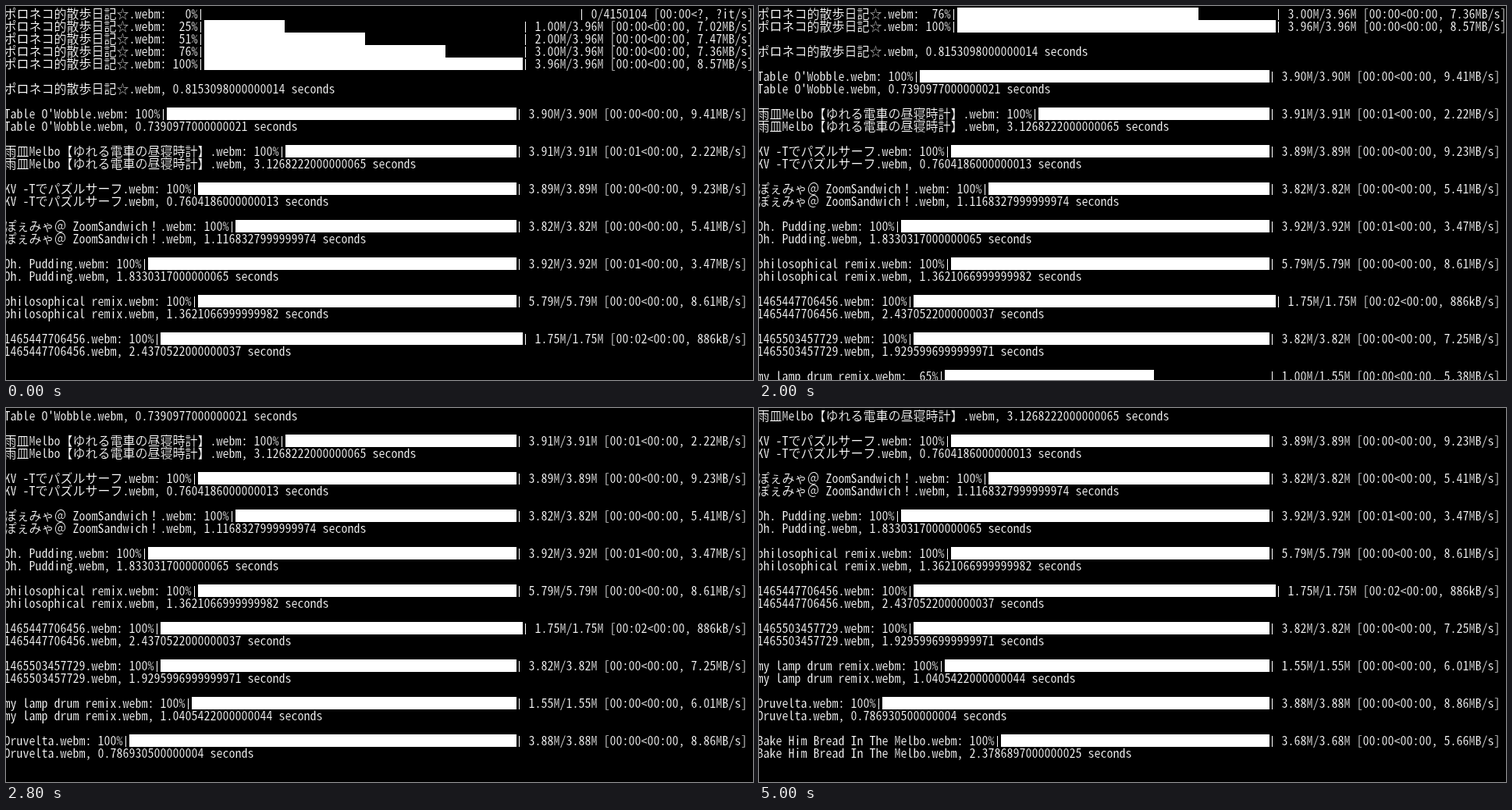
Recreate the animation shown at these times as an HTML page with a canvas. Size 957 by 479 pixels, loop 5.3 s.

```html
<!DOCTYPE html>
<html lang="ja">
<head>
<meta charset="utf-8">
<title>Download log</title>
<style>
  html, body { margin: 0; width: 100%; height: 100%; overflow: hidden; background: #000; }
  canvas { display: block; }
</style>
</head>
<body>
<canvas id="stage" width="957" height="479"></canvas>
<script>
const ctx = document.getElementById('stage').getContext('2d');
const LOOP = 5300, MB = 1048576;
const CELL = 8, ROW = 16, LEFT = -2, TOP = 2, ROWS = 30, COLS = 119;

const file = (name, bytes, rate, elapsed, seconds) =>
  ({ name: name + '.webm', bytes, rate, elapsed, seconds });

const first = file('ポロネコ的散歩日記☆', 4150104, '8.57MB/s', '00:00', '0.8153098000000014');
const finished = [
  file("Table O'Wobble", 4089446, '9.41MB/s', '00:00', '0.7390977000000021'),
  file('雨皿Melbo【ゆれる電車の昼寝時計】', 4099932, '2.22MB/s', '00:01', '3.1268222000000065'),
  file('KV -Tでパズルサーフ', 4078960, '9.23MB/s', '00:00', '0.7604186000000013'),
  file('ぽぇみゃ＠ ZoomSandwich！', 4005560, '5.41MB/s', '00:00', '1.1168327999999974'),
  file('Oh. Pudding', 4110418, '3.47MB/s', '00:01', '1.8330317000000065'),
  file('philosophical remix', 6071255, '8.61MB/s', '00:00', '1.3621066999999982'),
  file('1465447706456', 1835008, '886kB/s', '00:02', '2.4370522000000037')
];

// steps: [time, megabytes loaded, rate]
const jobs = [
  { file: file('1465503457729', 4005560, '7.25MB/s', '00:00', '1.9295996999999971'),
    steps: [[700, 0], [900, 1, '5.42MB/s'], [1000, 2, '6.00MB/s']], done: 1200 },
  { file: file('my lamp drum remix', 1625293, '6.01MB/s', '00:00', '1.0405422000000044'),
    steps: [[1900, 0], [2000, 1, '5.38MB/s']], done: 2100 },
  { file: file('Oruvelta', 4068475, '8.86MB/s', '00:00', '0.786930500000004'),
    steps: [[2400, 0], [2600, 1, '6.92MB/s'], [2700, 2, '7.64MB/s']], done: 2800 },
  { file: file('Bake Him Bread In The Melbo', 3860608, '5.66MB/s', '00:00', '2.3786897000000025'),
    steps: [[4400, 0], [4700, 1, '4.31MB/s'], [4800, 2, '4.87MB/s']], done: 5000 }
];

const isWide = ch => ch >= '\u2600';
const cellsOf = text => [...text].reduce((n, ch) => n + (isWide(ch) ? 2 : 1), 0);
const size = bytes => (bytes / MB).toFixed(2) + 'M';

function progress(f, bytes = f.bytes, rate = f.rate) {
  const part = bytes / f.bytes;
  const head = `${f.name}: ${String(Math.round(part * 100)).padStart(3)}%|`;
  const tail = bytes
    ? `| ${size(bytes)}/${size(f.bytes)} [${f.elapsed}<00:00, ${rate}]`
    : `| 0/${f.bytes} [00:00<?, ?it/s]`;
  // the star counts as one column but fills two
  const cols = COLS + (f.name.includes('☆') ? 1 : 0);
  return { head, tail, part, start: cellsOf(head), end: cols - tail.length };
}

const summary = f => ({ head: `${f.name}, ${f.seconds} seconds` });
const block = f => [progress(f), summary(f), null];

const history = [
  progress(first, 0),
  progress(first, MB, '7.02MB/s'),
  progress(first, 2 * MB, '7.47MB/s'),
  progress(first, 3 * MB, '7.36MB/s'),
  progress(first), null, summary(first), null,
  ...finished.flatMap(block)
];

function linesAt(t) {
  const lines = [...history];
  let scroll = 0;
  for (const job of jobs) {
    if (t >= job.done) {
      lines.push(...block(job.file));
      scroll += 3;
      continue;
    }
    const step = job.steps.filter(s => t >= s[0]).pop();
    if (step) lines.push(progress(job.file, step[1] * MB, step[2]));
    break;
  }
  return lines.slice(scroll, scroll + ROWS);
}

// A fine black outline trims the letters to hairline strokes.
function drawGlyph(ch, x, y) {
  ctx.fillText(ch, x, y);
  ctx.strokeText(ch, x, y);
}

function drawText(text, col, y) {
  for (const ch of text) {
    const x = LEFT + col * CELL, span = isWide(ch) ? 2 : 1;
    if (ch === '|') ctx.fillRect(x + 3, y + 2, 1, 14);
    else if (ch !== ' ') drawGlyph(ch, x + span * CELL / 2 - 0.5, y + 14);
    col += span;
  }
}

function drawLine(line, row) {
  if (!line) return;
  const y = TOP + row * ROW;
  drawText(line.head, 0, y);
  if (!line.tail) return;
  const width = Math.floor((line.end - line.start) * CELL * line.part);
  ctx.fillRect(LEFT + line.start * CELL, y, width, ROW);
  drawText(line.tail, line.end, y);
}

function draw(t) {
  ctx.fillStyle = '#000';
  ctx.fillRect(0, 0, 957, 479);
  ctx.fillStyle = '#fff';
  ctx.strokeStyle = '#000';
  ctx.lineWidth = 0.2;
  ctx.lineJoin = 'round';
  ctx.font = '100 16px "Noto Sans Mono CJK JP", "Noto Sans CJK JP", "Noto Sans CJK", "Liberation Mono", monospace';
  ctx.textAlign = 'center';
  ctx.textBaseline = 'alphabetic';
  linesAt(t).forEach(drawLine);
}

const begin = performance.now();
function tick() {
  draw((performance.now() - begin) % LOOP);
  requestAnimationFrame(tick);
}
tick();
</script>
</body>
</html>
```
